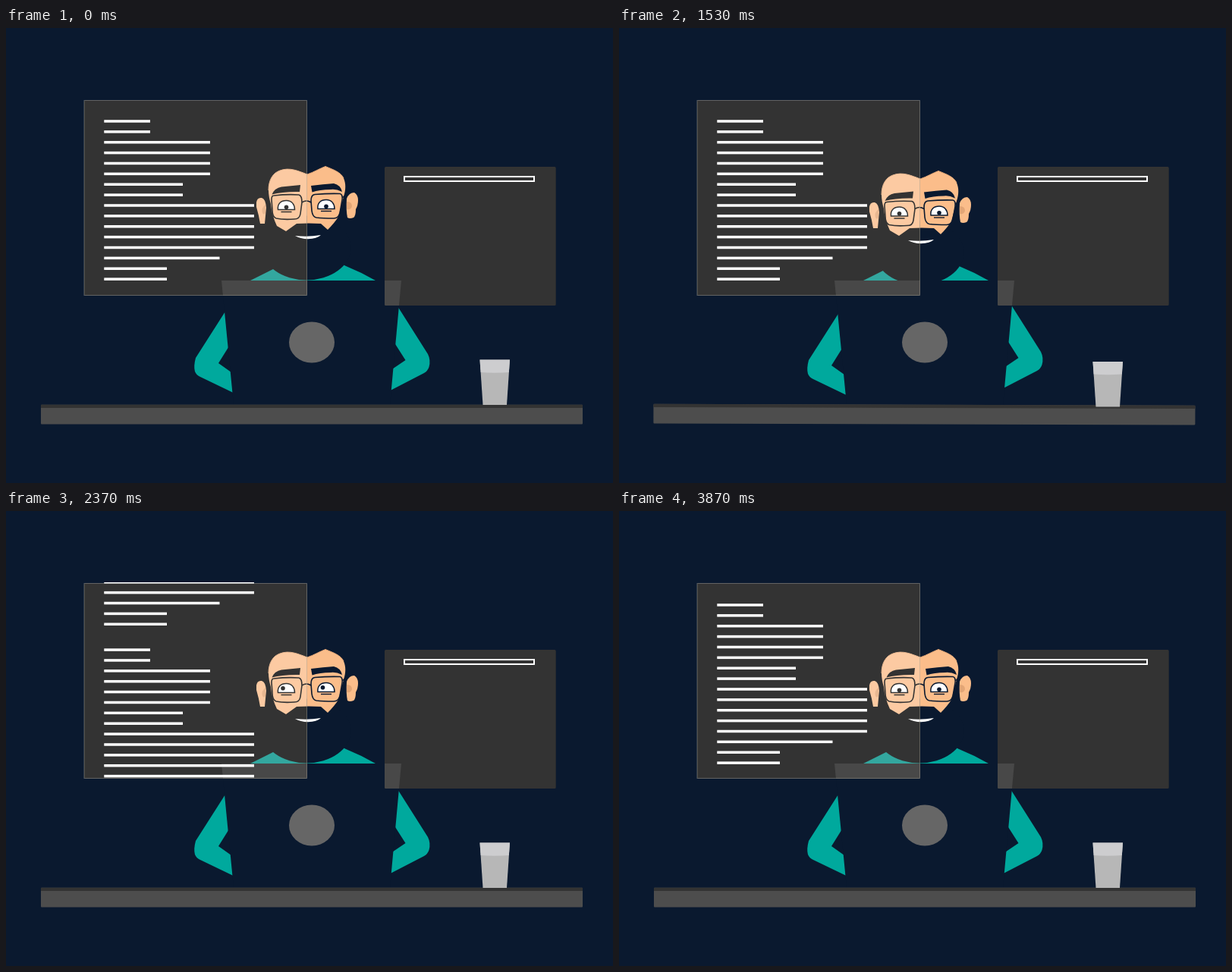
These frames come from a looping animation (800x600 px, 4.14 s). An HTML page with a canvas:

```html
<!DOCTYPE html>
<html lang="en">
<head>
<meta charset="utf-8">
<title>Developer at work</title>
<style>
html, body { margin: 0; width: 100%; height: 100%; overflow: hidden; background: #0a192f; }
canvas { display: block; }
</style>
</head>
<body>
<canvas id="stage" width="800" height="600"></canvas>
<script>
const ctx = document.getElementById('stage').getContext('2d');
const LOOP = 4140, STEP = 30, LAST = 3870;
const NAVY = '#0a192f', SKIN = '#fbbd8a', SHADE = '#e3a676', TEAL = '#00a99d', DARK_TEAL = '#009187';

const LEFT_PANEL = [103, 95.5, 293.5, 257];
const RIGHT_PANEL = [499, 183, 225.7, 183];
const LAPTOP = 'M284 333H521L506 497H300Z';
const LINE_ENDS = [190, 190, 269, 269, 269, 269, 233, 233, 327, 327, 327, 327, 327, 281.5, 212, 212];
const BOXES = [[526, 209, 170, 42.5], [527, 264.5, 82, 88.5], [620.5, 264.5, 74, 45.5], [621.5, 321.5, 57, 31.5]];

// Keyframes: time followed by values
const HEAD = [[30, 0], [240, 6], [1660, 6], [1860, 0]];
const GAZE = [[1680, 0, 0], [1850, -3, -1], [2300, -4.5, -2.5], [2640, -4.5, -2.5],
              [2900, 4, -2], [3600, 4, -2], [3800, 0, 0]];
const BROW = [[2640, 0], [2900, 2]];
// Desk tilt in degrees, one value every 90 ms
const TILT = [0, .5, -.6, .4, -.5, .6, -.3, -.16, 1, -1.1, .8, -.9, .3, -.5, .6, -.6, .5, .16,
              -.8, 1.1, -.9, -.7, -.3, .5, 0].map((a, i) => [i * 90, a]);

// Colour of hair, beard and laptop: always that of the backdrop
let ink = NAVY;

const clamp = x => Math.max(0, Math.min(1, x));
const ease = x => (1 - Math.cos(Math.PI * clamp(x))) / 2;

function track(keys, t, col = 1) {
  const n = keys.findIndex(k => k[0] > t);
  if (n === 0) return keys[0][col];
  if (n < 0) return keys[keys.length - 1][col];
  const a = keys[n - 1], b = keys[n];
  return a[col] + (b[col] - a[col]) * ease((t - a[0]) / (b[0] - a[0]));
}

function fill(d, color) {
  ctx.fillStyle = color;
  ctx.fill(new Path2D(d));
}

function stroke(d, color, width) {
  ctx.strokeStyle = color;
  ctx.lineWidth = width;
  ctx.stroke(new Path2D(d));
}

function oval(x, y, rx, ry, color) {
  ctx.fillStyle = color;
  ctx.beginPath();
  ctx.ellipse(x, y, rx, ry, 0, 0, 7);
  ctx.fill();
}

function group(x, y, draw) {
  ctx.save();
  ctx.translate(x, y);
  draw();
  ctx.restore();
}

function turn(deg, x, y) {
  ctx.translate(x, y);
  ctx.rotate(deg * Math.PI / 180);
  ctx.translate(-x, -y);
}

function drawArms(t) {
  const early = t < 2175;
  const phase = early ? t / 180 : (t - 2370) / 188;
  const reach = early ? 3 : t > 2746 && t < 3310 ? 5 : -3;
  const dy = reach * Math.sin(Math.PI * phase) ** 2;
  group(0, dy, () => fill('M301 355L250 435Q247 446 249 453Q251 458 256 460L311 486.500V464L280 442L305 402Z', TEAL));
  group(0, -dy, () => fill('M506 351L556 430Q560 438 557.500 447Q556 452 551 455L494 484.500V460L526.500 438L501 398Z', TEAL));
}

function drawEye(x, y, t) {
  group(x, y, () => {
    const d = 'M-11 12C-12 4 -7 0 0 0C7 0 11 5 11 12Z';
    fill(d, '#fff');
    stroke(d, ink, 1.5);
    stroke('M-7 15H7', ink, 1.4);
    oval(track(GAZE, t), 8.8 + track(GAZE, t, 2), 2.8, 2.8, ink);
  });
}

function drawFace(t) {
  fill('M330 230Q331 223 337 224Q342 225 343 237L341 258H335Q333 246 330 236Z', SKIN);
  fill('M342 233Q336 237 338 244Q340 247 342 244Z', SHADE);
  fill('M449 225Q452 217 459 217Q464 220 464 227Q464 234 461 239Q461 248 458 250Q453 252 450 250Q448 240 449 225Z', SKIN);
  fill('M449 229Q456 229 456 235Q455 240 449 239Z', SHADE);

  const brow = 'M346 214C346 200 352 191 361 188C374 183 386 189 397 193C406 190 414 185 421 182.500C432 187 441 190 445 198';
  fill(brow + 'C448 205 448 213 445 222L438 249Q433 257 424 266L415 258Q399 257 383 258' +
    'L369 268L357 261Q350 246 349 232Q346 222 346 214Z', SKIN);
  stroke(brow, SHADE, 1);
  fill('M381 274Q398 276 415 273Q410 278 398 278.300Q388 278 381 274Z', '#fff');
}

function drawFeatures(t) {
  drawEye(369.5, 227.5, t);
  drawEye(422, 226.5, t);
  stroke('M353 221Q370 219 386 220Q390 221 390 230L388 245Q387 252 380 252Q365 253 356 251Q351 249 351 240L350 226Q350 221 353 221Z' +
    'M407 219.500Q425 218 440 218.500Q444 219 443 227L440 244Q438 251 432 251Q417 251 409 250Q404 249 403 241L402 228Q402 220 407 219.500Z' +
    'M390 230Q396 226 402 230M443 224L448 220', ink, 1.6);
  group(track(BROW, t), 0, () => {
    fill('M350.500 219.500Q354 211 363 209.500L388 207L387 216Q365 215.500 350.500 219.500Z', ink);
    fill('M402 208Q418 206 432 205Q441 207 443 216Q435 212 428 213Q413 213 403.500 216.500Z', ink);
  });
}

function drawPerson(t) {
  const dy = track(HEAD, t);
  fill('M322 333L372 308L397 333Z', DARK_TEAL);
  fill('M397 333V308H420Q435 306 447 313.500Q468 322 487 333Z', TEAL);
  oval(396, 290 + dy, 58.5, 42.5, ink);
  group(0, dy, () => drawFace(t));
  group(0, dy * 1.42, () => drawFeatures(t));
  drawArms(t);
  fill(LAPTOP, ink);
  oval(403, 414.5, 30, 27, '#666');
}

// Dark glass over the person, with the laptop lid showing through
function drawGlass(t) {
  ctx.save();
  ctx.beginPath();
  ctx.roundRect(...LEFT_PANEL, 1.5);
  ctx.roundRect(...RIGHT_PANEL, 1.5);
  ctx.clip();
  ink = '#000';
  ctx.fillStyle = ink;
  ctx.fillRect(0, 0, 800, 600);
  drawPerson(t);
  ink = NAVY;
  ctx.fillStyle = 'rgba(255,255,255,.2)';
  ctx.fillRect(0, 0, 800, 600);
  fill(LAPTOP, '#484848');
  ctx.restore();

  ctx.strokeStyle = 'rgba(255,245,220,.3)';
  ctx.lineWidth = 1;
  ctx.strokeRect(...LEFT_PANEL);
}

function drawCode(t) {
  ctx.save();
  ctx.beginPath();
  ctx.rect(103, 94, 293.5, 260);
  ctx.clip();
  ctx.fillStyle = '#fff';
  const scroll = 241 * ease((t - 1726) / 961);
  for (const top of [121.2, 363.2]) {
    LINE_ENDS.forEach((end, i) => ctx.fillRect(129.3, top + 13.88 * i - scroll, end - 129.3, 3.5));
  }
  ctx.restore();
}

function drawLayout(t) {
  ctx.strokeStyle = '#fff';
  ctx.lineWidth = 2;
  ctx.strokeRect(525, 196, 171, 6);
  BOXES.forEach((box, i) => {
    ctx.globalAlpha = clamp((t - 2760 - i * 110) / 120) * clamp((3690 + i * 60 - t) / 90);
    ctx.strokeRect(...box);
  });
  ctx.globalAlpha = 1;
}

function drawDesk(t) {
  group(0, 0, () => {
    turn(track(TILT, t), 403, 300);
    fill('M47 496.700H759Q760 497 760 498V521Q760 522.500 759 522.500H47Q46 522.500 46 521V498Q46 497 47 496.700Z', '#4d4d4d');
    fill('M46 496.700H760V501H46Z', '#333');
  });

  const power = clamp(Math.min(t, 2190 - t) / 150);
  const wave = power * Math.cos(2 * Math.PI * (t - 630) / 258);
  group(0, wave > 0 ? -wave : -2.5 * wave, () => {
    turn(-1.5 * Math.max(0, wave), 644, 472);
    fill('M624.500 437.500H664L660 497H628.500Z', '#b7b7b7');
    fill('M624.500 437.500H664L662.800 454Q644 455.500 625.700 454Z', '#cdcdcf');
  });
}

function draw(t) {
  ctx.fillStyle = NAVY;
  ctx.fillRect(0, 0, 800, 600);
  drawPerson(t);
  drawGlass(t);
  drawCode(t);
  drawLayout(t);
  drawDesk(t);
}

const start = performance.now();
function tick() {
  const t = (performance.now() - start) % LOOP;
  draw(Math.min(LAST, Math.floor(t / STEP) * STEP));
  requestAnimationFrame(tick);
}
tick();
</script>
</body>
</html>
```
